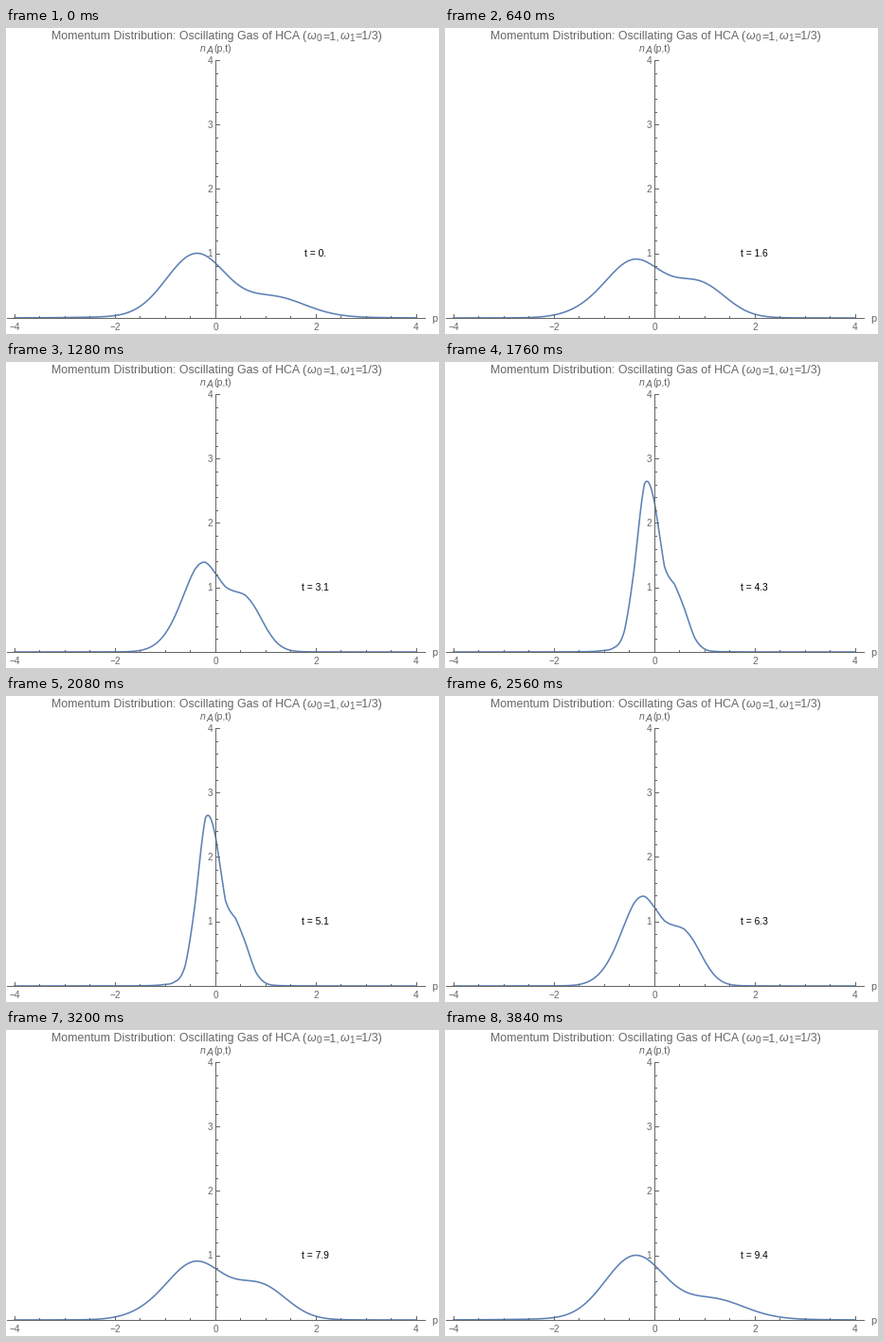
A matplotlib script for the animation above (4 s loop, 457x324 px).

```python
import numpy as np
import matplotlib.pyplot as plt
from matplotlib.animation import FuncAnimation

W, H, DPI = 457, 324, 100
FRAMES, STEP_MS = 25, 160
X0, Y0, SX, SY = 221, 307, 53.0, 68.25   # origin and pixels per unit
GRAY, BLUE = "#666666", "#5e81b5"
OMEGA0, OMEGA1, THETA = 1.0, 1 / 3, np.pi / 2

plt.rcParams["font.family"] = "Liberation Sans"

GRID = np.linspace(-4, 4, 41)
P = np.linspace(-4, 4, 1201)
R = np.linspace(0, 12, 601)
DR = np.full(R.size, R[1])
DR[[0, -1]] /= 2
NODES, WEIGHTS = np.polynomial.legendre.leggauss(60)


def momentum(p, t):
    """Momentum density of two hard-core anyons after a trap quench."""
    ratio = (OMEGA0 / OMEGA1) ** 2 - 1
    b = np.sqrt(1 + ratio * np.sin(OMEGA1 * t) ** 2)
    a = ratio * OMEGA1 * np.sin(2 * OMEGA1 * t) / 2
    q = (1 + a * a) * R ** 2 / 4
    fermi = 2 * np.exp(-q) * (1 - q)
    half = R[:, None] / 2
    u = half * NODES
    inner = (half ** 2 - u ** 2) * np.exp(-u ** 2 / 2) * np.cos(a * u * half)
    swap = np.sqrt(2 / np.pi) * np.exp(-R ** 2 / 4 - a * a * R ** 2 / 8)
    swap *= (inner @ WEIGHTS) * R / 2
    kr = b * np.outer(p, R)
    f = np.cos(kr) * (fermi + (1 - np.cos(THETA)) * swap)
    f -= np.sin(kr) * np.sin(THETA) * swap
    return b / np.pi * (f @ DR)


def cubic(x, ys):
    """Piecewise cubic through the four nearest grid points."""
    s = (x - GRID[0]) / (GRID[1] - GRID[0])
    first = np.clip(np.floor(s).astype(int) - 1, 0, len(GRID) - 4)
    d = s - first
    out = np.zeros_like(x)
    for i in range(4):
        basis = np.ones_like(x)
        for j in range(4):
            if j != i:
                basis *= (d - j) / (i - j)
        out += basis * ys[first + i]
    return out


def time_text(t):
    s = f"{t:.2f}" if t < 1 else f"{t:.1f}"
    return "t = " + s.rstrip("0") if t else "t = 0."


fig = plt.figure(figsize=(W / DPI, H / DPI), dpi=DPI, facecolor="white")
ax = fig.add_axes([0, 0, 1, 1])
ax.set_xlim(0, W)
ax.set_ylim(H, 0)
ax.axis("off")


def text(x, y, s, px, color=GRAY, **kw):
    kw = {"ha": "center", "va": "baseline", **kw}
    return ax.text(x, y, s, fontsize=px * 72 / DPI, color=color, **kw)


def row(x, y, *pieces):
    """Set pieces (string, size, drop, style) one after another."""
    for s, px, drop, style in pieces:
        piece = text(x, y + drop, s, px, ha="left", style=style)
        x += piece.get_window_extent().width + 0.6


def rule(x1, y1, x2, y2):
    """One-pixel line through pixel centres."""
    ax.plot([x1 + 0.5, x2 + 0.5], [y1 + 0.5, y2 + 0.5], color=GRAY,
            lw=72 / DPI, solid_capstyle="projecting", snap=False, zorder=3)


curve, = ax.plot([], [], color=BLUE, lw=1.6 * 72 / DPI, zorder=2)

rule(1, Y0, 442, Y0)
rule(X0, 34, X0, Y0)
for i in range(-8, 9):
    x = int(X0 + i * SX / 2)
    rule(x, Y0, x, Y0 - (4 if i % 4 == 0 else 2))
    if i % 4 == 0:
        text(x, 320, str(i // 2).replace("-", "\u2212"), 10)
for i in range(1, 21):
    y = round(Y0 - i * SY / 5)
    rule(X0, y, X0 + (4 if i % 5 == 0 else 2), y)
    if i % 5 == 0:
        text(218, y + 3.5, str(i // 5), 10, ha="right")

row(48, 12,
    ("Momentum Distribution: Oscillating Gas of HCA (", 12.4, 0, "normal"),
    ("\u03c9", 12.4, 0, "italic"), ("0", 10, 2, "normal"),
    ("=1,", 12.4, 0, "normal"),
    ("\u03c9", 12.4, 0, "italic"), ("1", 10, 2, "normal"),
    ("=1/3)", 12.4, 0, "normal"))
row(205, 25, ("n", 10.5, 0, "italic"), ("A", 10.5, 2, "italic"),
    ("(p,t)", 10.5, 0, "normal"))
text(452.5, 311, "p", 11)
clock = text(326.5, 242.5, "", 10.3, "black")


def draw(k):
    t = k * 3 * np.pi / (FRAMES - 1)
    n = cubic(P, momentum(GRID, t))
    curve.set_data(X0 + SX * P, Y0 - SY * n)
    clock.set_text(time_text(t))
    return curve, clock


anim = FuncAnimation(fig, draw, frames=FRAMES, interval=STEP_MS,
                     repeat=True, repeat_delay=0, blit=False)
plt.show()
```
